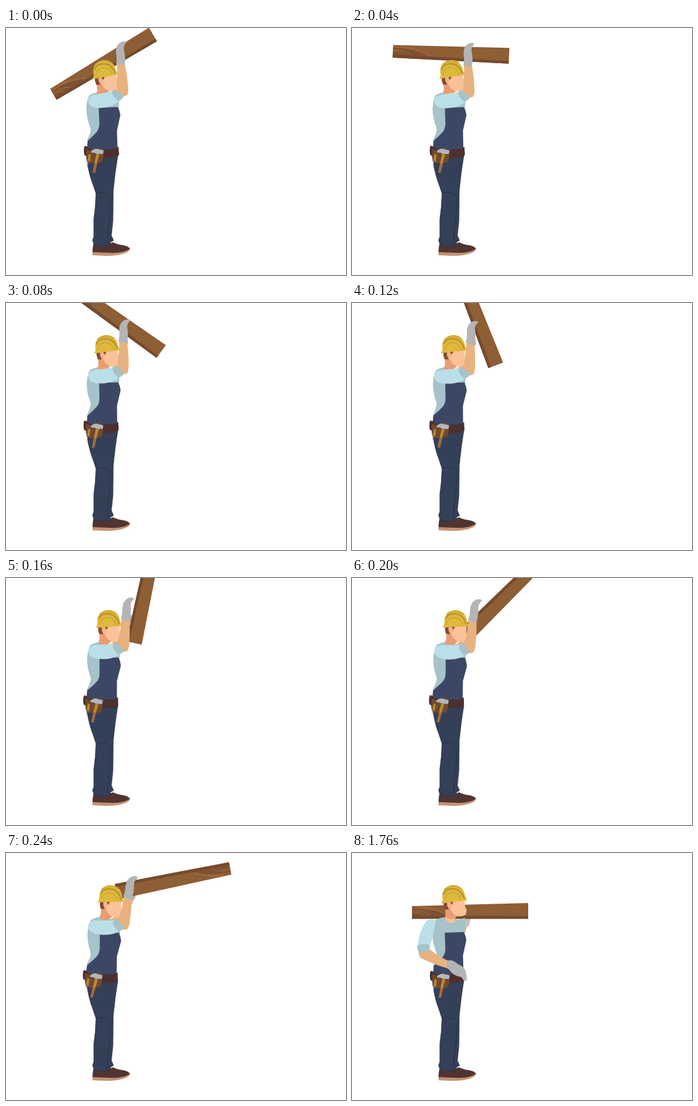
Recreate the animation shown at these times as an HTML page. Size 550 px wide and 400 px high, loop 1.8 s.

```html
<!DOCTYPE html>
<html lang="en">
<head>
<meta charset="utf-8">
<title>Worker with a plank</title>
<style>
html, body { margin: 0; width: 100%; height: 100%; overflow: hidden; background: #fff; }
svg { display: block; width: 550px; height: 400px; }
.skin { fill: #e8b27f; }
.glove { fill: #b3b4b4; }
.shirt { fill: #a5c3c9; }
.sleeve { fill: #bbdfe6; }
.wood { fill: #8e5e35; }
.dark { fill: #744a2f; }
.line { fill: none; stroke: #a9753f; stroke-width: .8; }
</style>
</head>
<body>
<svg viewBox="0 0 550 400">
  <g id="legs">
    <path fill="#c4936f" d="M140 362L201 356Q201 361 194 364Q183 369 162 369L140 368Z"/>
    <path fill="#503431" d="M142 348Q158 354 173 347Q181 351 191 352Q200 354 200 358Q189 365 168 364L140 363Q140 354 142 348Z"/>
    <path fill="#343f58" stroke="#29303f" stroke-width=".7" d="M130 206Q131 222 137 243Q142 257 145.500 268Q145 290 142 310L142 338L140 344L143 352Q156 355 168 352L169 347L174 344L170.500 336L173 312L173.500 264Q176 236 181 206Z"/>
    <path fill="none" stroke="#29303f" stroke-width=".9" d="M145 267Q163 264 172 275M169 274Q170 300 166 320L164 349"/>
  </g>

  <g id="farArm">
    <path class="skin" d="M168 108L178 101L196 78L205 80L192 112Z"/>
    <path class="glove" d="M195 80L201 62L210 65L209 73L203 81Z"/>
  </g>
  <g id="farHand">
    <path class="skin" d="M179 117L187 116L183 130L177 129Z"/>
    <path fill="#c9c0b8" d="M177 105L192 105L189 118L183 122L179 115Z"/>
  </g>

  <g id="plank">
    <path class="wood" d="M-94-20.500L94-25.500V0H-94Z"/>
    <path class="dark" d="M-94-5L94-4.500V0H-94Z"/>
    <path class="dark" opacity=".6" d="M-94-17Q-56-18-36-5H-94Z"/>
    <path class="line" d="M-94-17Q-56-18-36-6M-94-13Q-75-14-65-6M-94-10Q-82-11-76-6M-81-19Q-56-17-49-11"/>
  </g>

  <g id="torso">
    <path class="shirt" d="M135 109Q147 102 156 105L172 108L183 105Q184 117 182 130L152 132L152 162L132 186Q131 181 134 176Q137 168 137 163Q130 146 130 130Q131 114 135 109Z"/>
    <path fill="#3c4766" d="M150 129L181 128Q184 134 185 141L179.500 166L180.500 197H131L132 183Q141 175 147 168Q151 163 151 155Z"/>
    <path fill="#4c302f" d="M127 191Q132 191 135 196Q158 198 178 195L182 192L183 205Q181 209 172 210L140 212L127 206Q125 198 127 191Z"/>
    <path fill="#b4b4b0" d="M131 213L134 214L132 223Z"/>
    <path fill="#a26a3b" d="M146 203L151 205L144 235L140 234Z"/>
    <path fill="#71492c" d="M130 196Q144 202 158 200L157 212Q156 218 148 219L137 219Q131 218 130 210Z"/>
    <path fill="#b98935" d="M146 204L151 205L147 219L143 219ZM134 204L137 205L136 217L132 214Z"/>
    <path fill="#b5b6b7" d="M138 199Q144 194 149 196L158 198L157 204L147 204Q143 201 138 202Z"/>
    <path fill="#71492c" d="M150 192L153 193L152 197L149 196Z"/>
  </g>

  <g id="head">
    <path fill="#e99d73" d="M155 85L170 92L172 103L165 109Q157 111 151 104Q155 98 153 88Z"/>
    <path fill="#fbc199" d="M160 77H187L186 89L188 94L186 102Q178 106 170 102Q164 98 162 91L158 88Z"/>
    <path fill="#824c32" d="M152 78H169L165 84L163 80L159 91L153 90Q151 84 152 78Z"/>
    <path fill="#f4b08a" d="M158 79Q164 77 164 84Q163 90 160 90Q156 85 158 79Z"/>
    <path fill="#dfb93b" d="M148 80L151 75Q150 53 169 52Q187 53 188 73L191 79Q169 79 148 80Z"/>
    <path fill="none" stroke="#bd982f" stroke-width="3" d="M153 66Q157 57 169 58Q183 60 186 76"/>
    <path fill="none" stroke="#c6a033" stroke-width="1.2" d="M154 75Q157 64 168 64Q178 65 181 77M155 58Q169 49 183 59"/>
  </g>
  <path id="collar" fill="#f9c19a" d="M151 104Q158 109 166 106L166 112Q158 117 151 107Z"/>

  <g id="forearm">
    <path class="skin" d="M179 56L192 58Q196 76 197 90Q199 104 196 109L189 111L179 103Q181 80 179 56Z"/>
    <path class="glove" d="M178 58Q180 50 178 41Q177 29 184 24Q190 20 195 23Q190 28 190.500 34Q194 48 192 60Q186 61 178 58Z"/>
  </g>
  <g id="upperArm">
    <path class="sleeve" d="M133 118Q133 109 149 107L174 102L188 113Q179 126 158 129Q134 132 133 118Z"/>
    <path class="shirt" d="M171 105Q173 101 177 99Q184 106 191 110Q188 116 182 118Q174 113 171 105Z"/>
  </g>

  <g id="restArm">
    <path class="skin" d="M108 157L126 156Q142 169 159 176L155 187Q131 180 111 170Q107 165 108 157Z"/>
    <path class="glove" d="M152 184L156 174Q164 173 170 179Q181 184 184 191L186 206L181 207L177 201Q164 199 158 190Z"/>
    <path class="sleeve" d="M120 110Q126 106 135 109Q134 128 126 150L106 152Q108 128 120 110Z"/>
    <path class="shirt" d="M106 149Q117 146 126 149L125 159Q115 162 107 159Q105 154 106 149Z"/>
  </g>
</svg>
<script>
const LOOP = 1800, STEP = 40, SWING_STEPS = 6, REST_AT = 1760;
const part = Object.fromEntries([...document.querySelectorAll("[id]")].map(el => [el.id, el]));

const show = (on, ...ids) => ids.forEach(id => part[id].setAttribute("display", on ? "inline" : "none"));
const place = (id, transform) => part[id].setAttribute("transform", transform);
const turn = (id, angle, px, py, dx = 0, dy = 0) =>
  place(id, `translate(${dx} ${dy}) rotate(${angle} ${px} ${py})`);

function draw(ms) {
  const resting = ms >= REST_AT;
  const step = Math.min(Math.floor(ms / STEP), SWING_STEPS);
  const p = step / SWING_STEPS;

  show(resting, "restArm", "farHand", "collar");
  show(!resting, "farArm", "forearm", "upperArm");
  turn("torso", resting ? 0 : 3 * p, 157, 165);

  if (resting) {
    turn("head", -6, 163, 137, 2, 0);
    place("plank", "translate(191 106.5)");
    return;
  }
  turn("head", 8.5 * (p - 1), 163, 137);
  turn("farArm", 25 * (p - 1), 172, 108);
  turn("forearm", 13 * p, 193, 108, 0, 14 * p);
  turn("upperArm", 12 * p, 145, 117, 0, p);
  // the plank turns about a grip that drifts to the right
  place("plank", `translate(${187 + 8.2 * step} ${40.3 + 1.85 * step})
    rotate(${-30.3 + 33.25 * step}) translate(-35.1 12.5)`);
}

function tick() {
  draw(performance.now() % LOOP);
  requestAnimationFrame(tick);
}
tick();
</script>
</body>
</html>
```
